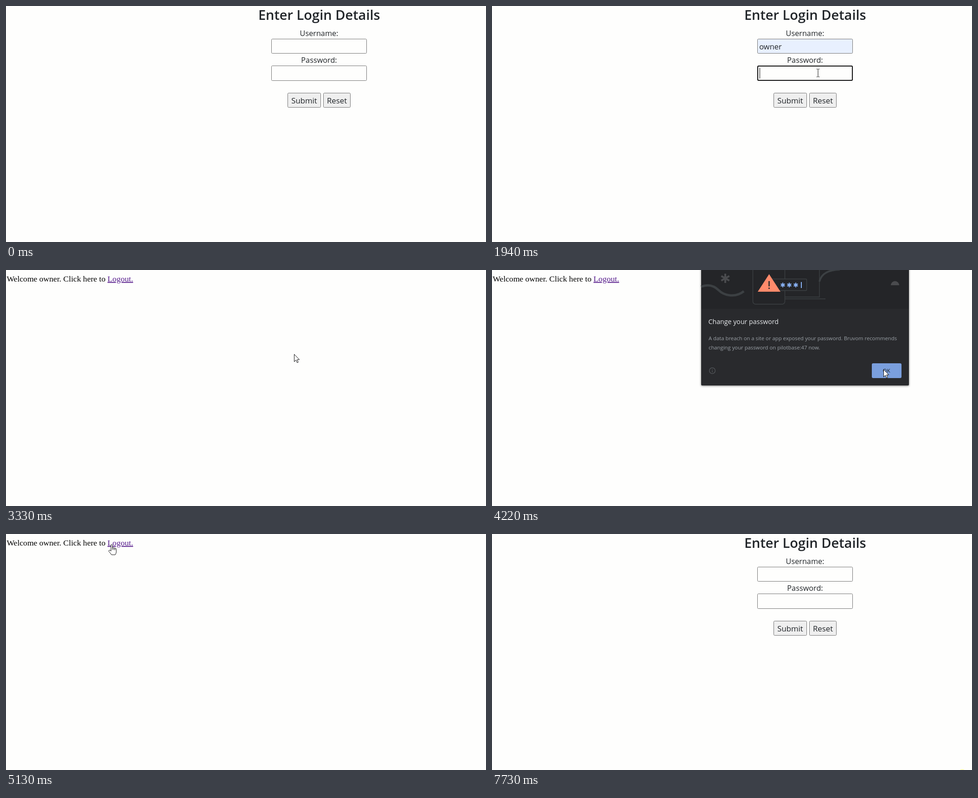
Recreate the animation shown at these times as an HTML page. Size 1035 px wide and 511 px high, loop 7800 ms.

```html
<!DOCTYPE html>
<html lang="en">
<head>
<meta charset="utf-8">
<title>Login demo</title>
<style>
  html, body { margin: 0; width: 100%; height: 100%; overflow: hidden; background: #fefefd; }
  svg { display: block; width: 1035px; height: 511px; font-family: "Open Sans", "Noto Sans", sans-serif; }
  text { white-space: pre; fill: #212529; }
  .mid { text-anchor: middle; }
  .bold { font-weight: 600; }
  .pale { fill: #e8eaed; }
  .dim { fill: #9aa0a6; }
  .serif { font-family: "Liberation Serif", serif; fill: #000; }
  .arial { font-family: "Liberation Sans", sans-serif; }
  .popup { filter: drop-shadow(0 1px 2px rgba(0, 0, 0, .5)); }
</style>
</head>
<body>
<svg id="stage" viewBox="0 0 1035 511"></svg>
<script>
const LOOP = 7800, STEP = 70, KEY_GAP = 154;
const PAPER = '#fefefd', PANEL = '#292a2d', LINE = '#3c4043', BLUE = '#8ab4f8';

// Moments when something happens, in ms.
const at = {
  enter: 50, focusUser: 740, hoverOption: 1190, pickOption: 1470, focusPass: 1870, type: 2120,
  submit: 2890, welcome: 2960, warn: 3450, dismiss: 4350, logout: 5390, leave: 7420, glow: 7730
};

// Places that react to the pointer.
const widget = {
  user: { x: 572, y: 71, w: 206, h: 32, page: 'login', cursor: 'ibeam' },
  pass: { x: 572, y: 129, w: 206, h: 33, page: 'login', cursor: 'ibeam' },
  submit: { x: 607, y: 188, w: 72, h: 32, page: 'login', cursor: 'hand' },
  reset: { x: 684, y: 188, w: 59, h: 32, page: 'login', cursor: 'hand' },
  link: { x: 219, y: 10, w: 56, h: 19, page: 'welcome', cursor: 'hand' },
  ok: { x: 819, y: 202, w: 64, h: 32, page: 'welcome', cursor: 'arrow' }
};

// Each move glides from the place before it; sag bows the path downwards.
const move = (start, end, x, y, sag = 0) => ({ start, end, x, y, sag });
const moves = [
  move(0, 0, 984, 493),
  move(50, 670, 706, 92),
  move(1050, 1260, 707, 115),
  move(1470, 1820, 703, 145),
  move(2400, 2820, 656, 198),
  move(3260, 3600, 341, 52),
  move(3650, 4040, 844, 215, 110),
  move(4290, 5060, 228, 22),
  move(5700, 6210, 733, 195, 90),
  move(6710, 6900, 1014, 24),
  move(7040, 7370, 988, 444)
];

const label = (x, y, size, str, kind = '', id = '') =>
  `<text id="${id}" class="${kind}" x="${x}" y="${y}" font-size="${size}">${str}</text>`;

const fillBox = (id, { x, y, w, h }, fill, r = 0) =>
  `<rect id="${id}" x="${x}" y="${y}" width="${w}" height="${h}" rx="${r}" fill="${fill}"/>`;

const frameBox = (id, { x, y, w, h }, fill, stroke, width = 1) =>
  `<rect id="${id}" x="${x + width / 2}" y="${y + width / 2}" width="${w - width}" height="${h - width}"
    rx="2" fill="${fill}" stroke="${stroke}" stroke-width="${width}"/>`;

const star = (x, y, r, color, width) => [30, 90, 150].map(deg =>
  `<path d="M${-r} 0H${r}" transform="translate(${x} ${y}) rotate(${deg})" stroke="${color}" stroke-width="${width}"/>`
).join('');

const field = (id, title) => {
  const b = widget[id];
  return label(675, b.y - 6, 16.25, title, 'mid') +
    frameBox(id, b, PAPER, '#767676') + frameBox(id + 'Focus', b, 'none', '#101010', 2);
};

const button = (id, title) => {
  const b = widget[id];
  return frameBox(id, b, '#efefef', '#767676') + label(b.x + b.w / 2, b.y + 23, 16.8, title, 'mid');
};

const each = (list, draw) => list.map(draw).join('');

const loginPage = `<g id="login">
  ${label(675.3, 30, 29, 'Enter Login Details', 'mid bold')}
  ${field('user', 'Username:')}
  ${label(576.5, 94, 14.5, 'owner', 'arial', 'preview')}
  ${label(576.2, 94, 16.5, 'owner', '', 'name')}
  ${field('pass', 'Password:')}
  ${each([0, 1, 2], i => `<circle id="dot${i}" cx="${580 + 7 * i}" cy="147" r="2.4"/>`)}
  <rect id="caret" width="1" height="23"/>
  ${button('submit', 'Submit')}
  ${button('reset', 'Reset')}
  <g id="suggest" class="popup">
    ${fillBox('list', { x: 572, y: 105, w: 206, h: 124 }, PANEL, 4)}
    ${fillBox('hover', { x: 572, y: 113, w: 206, h: 36 }, '#4b4c4f')}
    ${each(['owner', 'rev', 'ne'], (s, i) => label(583.6, 136 + 36 * i, 12.3, s, 'bold pale'))}
  </g>
</g>`;

const dialog = `<g id="dialog" class="popup">
  ${fillBox('panel', { x: 451, y: -6, w: 448, h: 256 }, PANEL, 2)}
  <path d="M451 0H899V84H451Z" fill="#242528"/>
  <g fill="none" stroke="${LINE}">
    <path d="M451 36C467 30 479 34 489 44S523 62 543 46" stroke-width="5"/>
    ${star(503, 18, 10, '#4a4b4e', 4)}
    <path d="M706 0V58.5H631M631 62.5H719" stroke-width="1.4"/>
    <path d="M706 25Q712 0 750 -1" stroke-width="4"/>
    <g fill="#242528" stroke-width="1.4">
      <rect x="562.5" y="-8" width="69" height="82" rx="6"/>
      <rect x="600.5" y="19.5" width="78" height="25" rx="2"/>
    </g>
  </g>
  <path d="M860 33A9 9 0 0 1 878 33Z" fill="#4a4b4e"/>
  ${each([0, 1, 2], i => star(627 + 14 * i, 32.5, 5, BLUE, 2.2))}
  <path d="M667 26V39" stroke="${BLUE}" stroke-width="2"/>
  <path d="M597.5 9L622 47H573Z" fill="#ff8a6b"/>
  <path d="M597.5 24V35.5M597.5 38V41" stroke="${PANEL}" stroke-width="2.6"/>
  ${label(466.5, 117, 14.2, 'Change your password', 'pale')}
  ${label(467, 152, 11.3, 'A data breach on a site or app exposed your password. Bruvom recommends', 'dim')}
  ${label(467, 172, 11.3, 'changing your password on pilotbase:47 now.', 'dim')}
  <g fill="none" stroke="#54575b" stroke-width="1.3">
    <circle cx="475" cy="218" r="6.3"/>
    <path d="M475 214.5V216M475 217.3V221.5"/>
  </g>
  ${fillBox('ok', widget.ok, BLUE, 3)}
  ${label(850.5, 222, 11.5, 'OK', 'mid')}
</g>`;

const welcomePage = `<g id="welcome">
  <text class="serif" x="1.4" y="25" font-size="17.6">Welcome owner. Click here to <tspan
    fill="#551a8b" text-decoration="underline">Logout.</tspan></text>
  ${dialog}
</g>`;

const pointer = `<g id="pointer" stroke="#111" fill="#fff">
  <path id="arrow" d="M.5 .5V16.5L4.2 13 6.8 18.7 9.2 17.7 6.7 12.1H11.6Z"/>
  <g id="hand" stroke-linejoin="round">
    <path d="M-1.6 1.8Q0-.7 1.5 1.8V8Q3 6.5 4.3 8.3 6 7.2 7 9 9 8.3 9.8 10.3V16Q9.8 20 7.5 23H-.5Q-3 19-6.5 15.5-6.5 12.5-3.8 13L-1.6 15Z"/>
    <path d="M1.5 8V12M4.3 8.5V12.5M7 9.3V13" fill="none"/>
  </g>
  <path id="ibeam" d="M-3-8.5H-1L0-7.5 1-8.5H3M0-7.5V7.5M-3 8.5H-1L0 7.5 1 8.5H3" fill="none"/>
</g>`;

const stage = document.getElementById('stage');
stage.innerHTML = loginPage + welcomePage +
  '<ellipse id="glow" cx="1014" cy="512" rx="5" ry="2.5" fill="#ffff99"/>' + pointer;

const el = {};
stage.querySelectorAll('[id]').forEach(node => { el[node.id] = node; });

const set = (id, attrs) => Object.entries(attrs).forEach(([k, v]) => el[id].setAttribute(k, v));
const show = (id, on) => set(id, { display: on ? 'inline' : 'none' });
const clamp = v => Math.max(0, Math.min(1, v));
const ease = k => k * k * (3 - 2 * k);
const pageAt = t => t >= at.welcome && t < at.logout ? 'welcome' : 'login';

// The pointer keeps its shape after a move, even when the page below changes.
function pointerAt(t) {
  const i = moves.findLastIndex(m => m.start <= t);
  const to = moves[i], from = moves[Math.max(0, i - 1)];
  const elapsed = Math.floor((t - to.start) / STEP) * STEP;
  const k = to.end > to.start ? ease(clamp(elapsed / (to.end - to.start))) : 1;
  return {
    x: Math.round(from.x + (to.x - from.x) * k),
    y: Math.round(from.y + (to.y - from.y) * k + to.sag * Math.sin(Math.PI * k)),
    page: pageAt(Math.min(t, to.end))
  };
}

const isOver = (p, b) =>
  p.page === b.page && p.x >= b.x && p.x < b.x + b.w && p.y >= b.y && p.y < b.y + b.h;

function renderPointer(p, t) {
  const target = Object.values(widget).find(b => isOver(p, b));
  const shape = target ? target.cursor : 'arrow';
  show('pointer', t >= at.enter && t < at.leave);
  set('pointer', { transform: `translate(${p.x} ${p.y})` });
  ['arrow', 'hand', 'ibeam'].forEach(id => show(id, id === shape));
}

function renderLogin(p, t) {
  const during = (from, to) => t >= from && t < to;
  const preview = during(at.hoverOption, at.pickOption);
  const filled = during(at.pickOption, at.welcome);
  const userFocus = during(at.focusUser, at.focusPass);
  const passFocus = during(at.focusPass, at.submit);
  const typed = during(at.type, at.welcome) ? Math.min(3, Math.floor((t - at.type) / KEY_GAP) + 1) : 0;

  show('suggest', during(at.focusUser, at.pickOption));
  show('hover', preview);
  show('preview', preview);
  show('name', filled);
  set('user', { fill: preview || filled ? '#e8f0fe' : PAPER });
  show('userFocus', userFocus);
  show('passFocus', passFocus);
  for (let i = 0; i < 3; i++) show('dot' + i, i < typed);

  show('caret', userFocus || passFocus);
  set('caret', {
    x: userFocus && filled ? 626 : 577 + 7 * typed,
    y: (userFocus ? widget.user : widget.pass).y + 5
  });

  ['submit', 'reset'].forEach(id => {
    const hot = isOver(p, widget[id]);
    set(id, { fill: hot ? '#e5e5e5' : '#efefef', stroke: hot ? '#4a4a4a' : '#767676' });
  });
}

function render(t) {
  const p = pointerAt(t), page = pageAt(t);
  show('login', page === 'login');
  show('welcome', page === 'welcome');
  renderPointer(p, t);
  renderLogin(p, t);

  const opacity = clamp((t - at.warn) / 140) * clamp(1 - (t - at.dismiss) / 140);
  show('dialog', opacity > 0);
  set('dialog', { opacity });
  set('ok', { fill: isOver(p, widget.ok) ? '#7a9fdd' : BLUE });
  show('glow', t >= at.glow);
}

const start = performance.now();
function tick() {
  render((performance.now() - start) % LOOP);
  requestAnimationFrame(tick);
}
tick();
</script>
</body>
</html>
```
